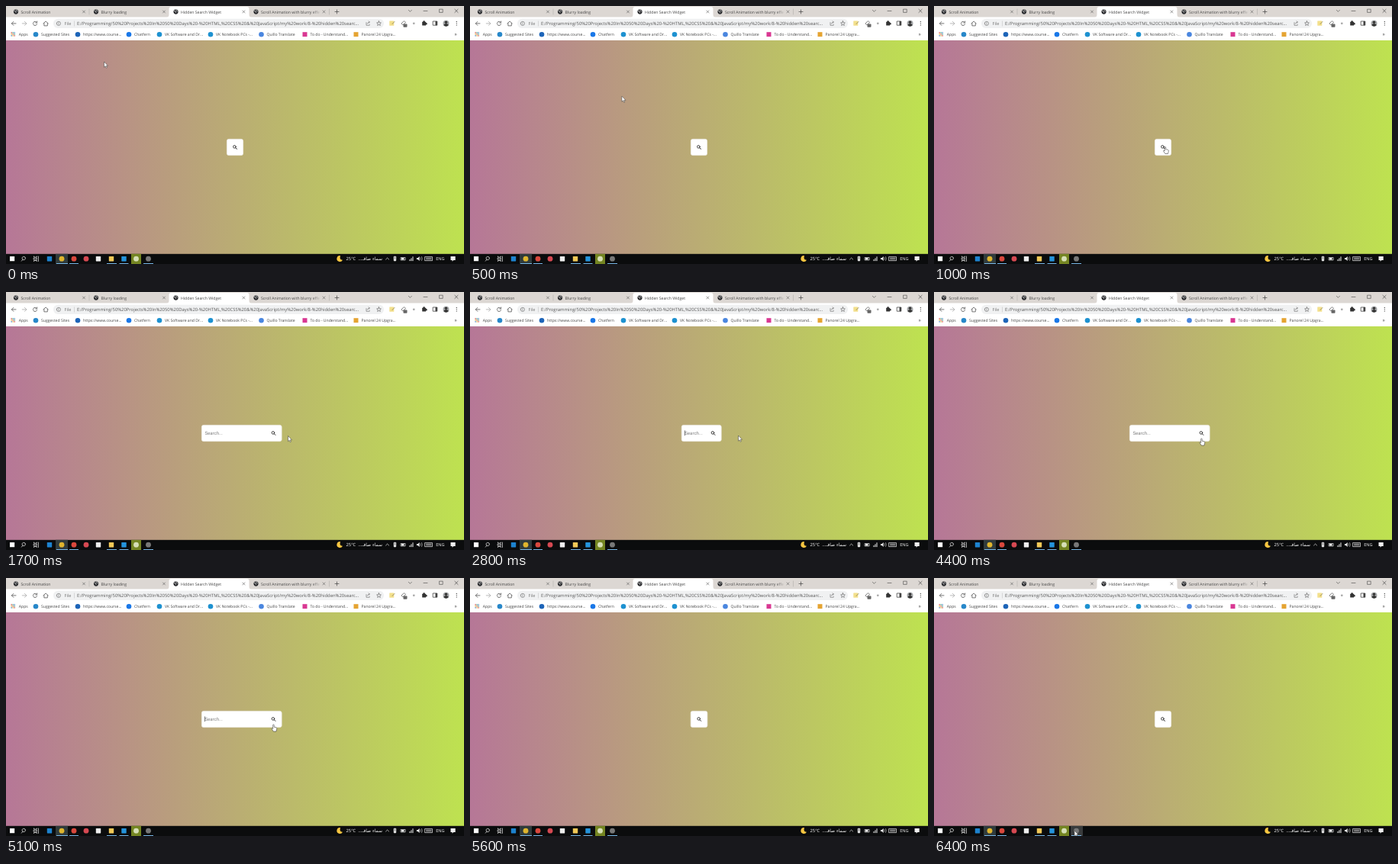
Animation, 600 px wide and 338 px high, one loop 6500 ms. Source, as an HTML page:

```html
<!DOCTYPE html>
<html lang="en">
<head>
<meta charset="utf-8">
<title>Hidden Search Widget</title>
<style>
html, body { margin: 0; width: 100%; height: 100%; overflow: hidden; }
svg { display: block; width: 100%; height: 100%; }
text { font-family: "Open Sans", "Noto Sans", sans-serif; white-space: pre; text-rendering: geometricPrecision; }
.line { fill: none; stroke-linecap: round; stroke-linejoin: round; }
</style>
</head>
<body>
<svg viewBox="0 0 600 338">
  <defs>
    <linearGradient id="page">
      <stop offset="0" stop-color="#b67797"/>
      <stop offset="1" stop-color="#bee250"/>
    </linearGradient>
    <linearGradient id="fade">
      <stop offset="0" stop-color="#dcd7d3" stop-opacity="0"/>
      <stop offset="1" stop-color="#dcd7d3"/>
    </linearGradient>
    <clipPath id="inputClip"><rect id="inputArea" y="174" height="22"/></clipPath>
  </defs>
  <rect y="44" width="600" height="281" fill="url(#page)"/>
  <g id="browser"></g>
  <g id="search">
    <rect id="box" y="174.4" height="21.2" rx="2.4" fill="#fff" stroke="#efede6" stroke-width=".8"/>
    <g clip-path="url(#inputClip)">
      <text id="hint" y="187" font-size="6.1" fill="#808080" style="font-family:Roboto,sans-serif">Search...</text>
      <rect id="caret" y="181.4" width=".6" height="6.8" fill="#222"/>
    </g>
    <g id="lens" class="line" stroke="#222">
      <circle cx="-.6" cy="-.6" r="1.8" stroke-width=".85"/>
      <path d="M.8.8 2.4 2.4" stroke-width="1"/>
    </g>
  </g>
  <g id="taskbar"></g>
  <g id="pointer">
    <path id="arrow" d="M0 0V7.2L1.7 5.7 2.8 8.2 3.9 7.7 2.8 5.3H5Z" fill="#fff" stroke="#333" stroke-width=".5"/>
    <path id="hand" d="M-.8.4Q0-.5.7.4V3.2L3.6 3.9Q4.5 4.3 4.3 5.4L3.5 9H-.2L-2.4 5.6Q-2.5 4.5-1.4 4.8L-.8 5.5Z" fill="#fff" stroke="#333" stroke-width=".55"/>
  </g>
</svg>
<script>
const $ = id => document.getElementById(id);
const rect = (x, y, w, h, fill, rx = 0) =>
  `<rect x="${x}" y="${y}" width="${w}" height="${h}" rx="${rx}" fill="${fill}"/>`;
const dot = (x, y, r, fill) => `<circle cx="${x}" cy="${y}" r="${r}" fill="${fill}"/>`;
const line = (d, color = '#555', width = .7) =>
  `<path class="line" d="${d}" stroke="${color}" stroke-width="${width}"/>`;
const label = (x, y, words, size = 5.1, fill = '#444', extra = '') =>
  `<text x="${x}" y="${y}" font-size="${size}" fill="${fill}" ${extra}>${words}</text>`;
const cross = (x, y, r, color) =>
  line(`M${x - r} ${y - r}l${2 * r} ${2 * r}m0 ${-2 * r}l${-2 * r} ${2 * r}`, color, .6);
const globe = x => dot(x, 7.6, 3.1, '#2c2d30') +
  line(`M${x - 2} 6.4l1.6.5.4 1.5M${x + .6} 5.4l1.2 1.6`, '#ddd', .8);

function tabs() {
  const titles = [
    [13, 'Scroll Animation'], [118, 'Blurry loading'],
    [222.5, 'Hidden Search Widget'], [327.5, 'Scroll Animation with blurry effe'],
  ];
  return rect(0, 0, 600, 15, '#dcd7d3') +
    '<path d="M210 15Q213.5 15 213.5 11V4Q213.5 1 216.5 1H315.5Q318.5 1 318.5 4V11Q318.5 15 322 15Z" fill="#fff"/>' +
    titles.map(([x, words]) =>
      globe(x) + label(x + 6.5, 9.6, words, 5.15) + cross(x + 89, 7.5, 1.5, '#555')).join('') +
    rect(400, 2, 13, 11, 'url(#fade)') +
    line('M109 4V11M423.5 4V11', '#a8a4a1', .5) +
    line('M431 7.5h5M433.5 5v5', '#444') +
    line('M527.4 5.4l2 2 2-2M547 6.5h5', '#444', .6) +
    line('M568 4.2h4.2v4.2h-4.2z', '#444', .6) + cross(590, 6.4, 2.1, '#333');
}

function toolbar() {
  const path = 'E:/Programming/50%20Projects%20In%2050%20Days%20-%20HTML,%20CSS%20&amp;%20JavaScript/my%20work/8-%20hidden%20searc...';
  return rect(0, 14.5, 600, 30.5, '#fff') +
    line('M13 22.9H7.4m2.5-2.5-2.5 2.5 2.5 2.5', '#555', .8) +
    line('M21.3 22.9h5.6m-2.5-2.5 2.5 2.5-2.5 2.5', '#aaa', .8) +
    line('M40.1 21.3a2.6 2.6 0 1 0 .5 2.3M40.7 20v1.9h-2', '#555', .8) +
    line('M48.9 22.9l3.2-2.9 3.2 2.9M49.9 22.5v3.4h4.4v-3.4', '#555', .8) +
    rect(62, 16.8, 433, 12.2, '#f0f1f2', 6.1) +
    line('M66.3 22.9a2.6 2.6 0 1 0 5.2 0 2.6 2.6 0 1 0-5.2 0M68.9 22.8v1.3M68.9 21.5v.1', '#666', .6) +
    label(76.5, 25.3, 'File', 5.6, '#777') + rect(89.5, 19.5, .5, 7, '#bbb') +
    label(93, 25.3, path, 5.88, '#555') +
    line('M472 21.6v3.7h4.2v-1.2M473.3 23.2q.4-2.1 3-2.1m-1.2-1.3 1.3 1.3-1.3 1.2', '#666', .6) +
    line('M488.5 19.8l.8 2 2.1.2-1.6 1.4.5 2.1-1.8-1.1-1.8 1.1.5-2.1-1.6-1.4 2.1-.2z', '#555', .6) +
    rect(502.3, 19.4, 6, 6.4, '#f3e08c', .5) + line('M506 23.6l3-3.2', '#8a7d5a', .8) +
    line('M518.2 22.6l3.4-3 2 2-3.4 3z', '#777', .9) + rect(520.5, 23.5, 5, 4.2, '#666', .8) +
    dot(534.3, 22.8, 1.4, '#aaa') +
    rect(545.2, 20.7, 4.9, 4.9, '#333', .5) + dot(547.6, 20.5, 1.3, '#333') + dot(550.4, 23.2, 1.3, '#333') +
    line('M559.6 20h5.2v5.2h-5.2z', '#444', .8) + rect(562.5, 20, 2.5, 5.2, '#444') +
    dot(576.5, 22.8, 4, '#a6a8aa') + dot(576.5, 21.3, 1.7, '#333') +
    '<path d="M573.2 25q3.3-4 6.6 0-3.3 3.5-6.6 0" fill="#333"/>' +
    [20.5, 22.8, 25.1].map(y => dot(590.3, y, .65, '#444')).join('');
}

function bookmarks() {
  const entries = [
    [39, '#2787c9', 'Suggested Sites'], [94, '#1d64b8', 'https://www.course...'],
    [161, '#1977e8', 'Chatfern'], [201, '#1d91d0', 'VK Software and Dr...'],
    [268, '#1d91d0', 'VK Notebook PCs -...'], [334.5, '#4a86df', 'Quillo Translate'],
    [391.5, '#d93792', 'To do - Understand...', 1], [458.5, '#e5a331', 'Panorel 24 Upgra...', 1],
  ];
  const colors = ['#d55', '#4a8', '#58c', '#db4'];
  const apps = Array.from({ length: 9 }, (_, i) =>
    rect(6.5 + i % 3 * 2, 34.2 + Math.floor(i / 3) * 2, 1.4, 1.4, colors[i % 4])).join('');
  return apps + label(16.8, 39.1, 'Apps') +
    entries.map(([x, color, words, square]) =>
      (square ? rect(x - 3, 34.2, 6, 6, color) : dot(x, 37.2, 3.3, color)) +
      label(x + 7, 39.1, words)).join('') +
    label(587.5, 39.3, '»', 6.5);
}

function taskbar() {
  const top = 324.8, height = 13.2;
  const apps = [
    [57, '#1d83cf', 1], [73, '#dfb52e'], [89, '#d9483d'], [105, '#d64952'], [121, '#eee', 1],
    [138, '#f2c957', 1], [154.5, '#2494dc', 1], [170.5, '#d6dfb6'], [186.5, '#777'],
  ];
  return rect(0, top, 600, height, '#0b0c0d') +
    rect(65, top, 16, height, '#303b3c') + rect(164, top, 13, height, '#748522') +
    `<rect id="hover" x="179" y="${top}" width="16" height="${height}" fill="#393b3c"/>` +
    rect(5, 328, 6.2, 6.2, '#fff') +
    line('M25.4 329.9a2.2 2.2 0 1 0-4.2 1.3 2.2 2.2 0 0 0 4.2-1.3M22 332.1l-1.7 2', '#eee', .7) +
    line('M36.5 328v1h4v-1M36.5 334.5v-1h4v1M36.5 330.2h4v2h-4zM42.5 328v6.5', '#eee', .7) +
    apps.map(([x, color, square]) => square
      ? rect(x - 3.2, 328, 6.4, 6.4, color, .6) : dot(x, 331.2, 3.4, color)).join('') +
    [[66, 15], [83, 12], [132, 13], [148.5, 12], [180, 13]]
      .map(([x, w]) => rect(x, 337, w, 1, '#76b6e6')).join('') +
    '<path d="M438 327a4 4 0 1 0 3 5.7q-4.8.2-3-5.7" fill="#f7c641"/>' +
    label(445.5, 333.4, '25°C', 5.8, '#fff') +
    label(477, 333.4, 'سماء صافـ...', 5.9, '#fff',
      'text-anchor="middle" direction="rtl" style="font-family:\'DejaVu Sans\',sans-serif"') +
    line('M497.6 332l2-2 2 2', '#eee') +
    rect(507.8, 327.8, 3.4, 6.4, '#ddd', 1) + line('M509.5 329v2', '#333', .6) +
    line('M517.5 329.5h5.6v3.4h-5.6z', '#eee', .7) + rect(518, 330, 3.5, 2.5, '#eee') +
    line('M529 333.7v-1.4M531 333.7v-3M533 333.7v-5', '#eee', 1) +
    '<path d="M538 330h1.6l2-2v6l-2-2h-1.6z" fill="#eee"/>' +
    line('M543 329.5q1.2 1.5 0 3M544.6 328.5q1.8 2.5 0 5', '#eee', .5) +
    line('M549 328.6h9.5v5h-9.5zM550.5 330.2h6.5M550.5 331.8h6.5', '#eee', .7) +
    label(563.3, 333.3, 'ENG', 5.5, '#fff') +
    '<path d="M582.5 328h6.2v5h-2.4l-1.7 1.8v-1.8h-2.1z" fill="#eee"/>';
}

$('browser').innerHTML = tabs() + toolbar() + bookmarks();
$('taskbar').innerHTML = taskbar();

const LOOP = 6500, STEP = 100, SLIDE = 300;
const clicks = [1180, 2690, 3650, 5330];
// time, x, y of the pointer tip
const route = [
  [0, 128.5, 73], [200, 132, 76], [900, 302, 183], [1000, 303, 184.5], [1200, 303, 184.5],
  [1600, 369.5, 188.5], [1900, 369.5, 188.5], [2400, 351.5, 188], [2900, 351.5, 188],
  [3400, 301, 187], [3700, 301, 187], [4200, 350.5, 192], [5300, 350.5, 192],
  [5600, 300, 340], [5900, 215, 338], [6200, 184, 332], [6300, 184, 331], [6500, 184, 331],
];
const mix = (a, b, k) => a + (b - a) * k;
const bezier = (a, b, s) => 3 * (1 - s) ** 2 * s * a + 3 * (1 - s) * s * s * b + s ** 3;

function ease(x) {
  let low = 0, high = 1;
  for (let i = 0; i < 20; i++) {
    const s = (low + high) / 2;
    if (bezier(.25, .25, s) < x) low = s; else high = s;
  }
  return bezier(.1, 1, low);
}

function pointerAt(t) {
  const i = route.findIndex(key => key[0] > t);
  const [t0, x0, y0] = route[i - 1], [t1, x1, y1] = route[i];
  const k = (t - t0) / (t1 - t0), smooth = k * k * (3 - 2 * k);
  return [mix(x0, x1, smooth), mix(y0, y1, smooth)];
}

function render(t) {
  const count = clicks.filter(c => c <= t).length;
  const since = count ? t - clicks[count - 1] : Infinity;
  const slide = since < SLIDE ? ease(since / SLIDE) : 1;
  const open = count % 2 ? slide : count ? 1 - slide : 0;
  const left = 300 - mix(22, 88, open) / 2;
  const button = left + 83.5 * open;

  $('box').setAttribute('x', left + .4);
  $('box').setAttribute('width', button + 21.2 - left);
  $('inputArea').setAttribute('x', left);
  $('inputArea').setAttribute('width', button - left);
  $('hint').setAttribute('x', left + 4.4);
  $('caret').setAttribute('x', left + 4.2);
  $('caret').style.display = since % 1000 < 500 ? '' : 'none';
  $('lens').setAttribute('transform', `translate(${button + 11} 185)`);

  const [x, y] = pointerAt(t);
  const overButton = x >= button && x <= button + 22 && y >= 174 && y <= 196;
  $('pointer').setAttribute('transform', `translate(${x} ${y})`);
  $('hand').style.display = overButton ? '' : 'none';
  $('arrow').style.display = overButton ? 'none' : '';
  $('hover').style.display = y > 324 && y < 338 && x > 179 && x < 195 ? '' : 'none';
}

const start = performance.now();
function tick() {
  const t = (performance.now() - start) % LOOP;
  render(Math.floor(t / STEP) * STEP);
  requestAnimationFrame(tick);
}
tick();
</script>
</body>
</html>
```
